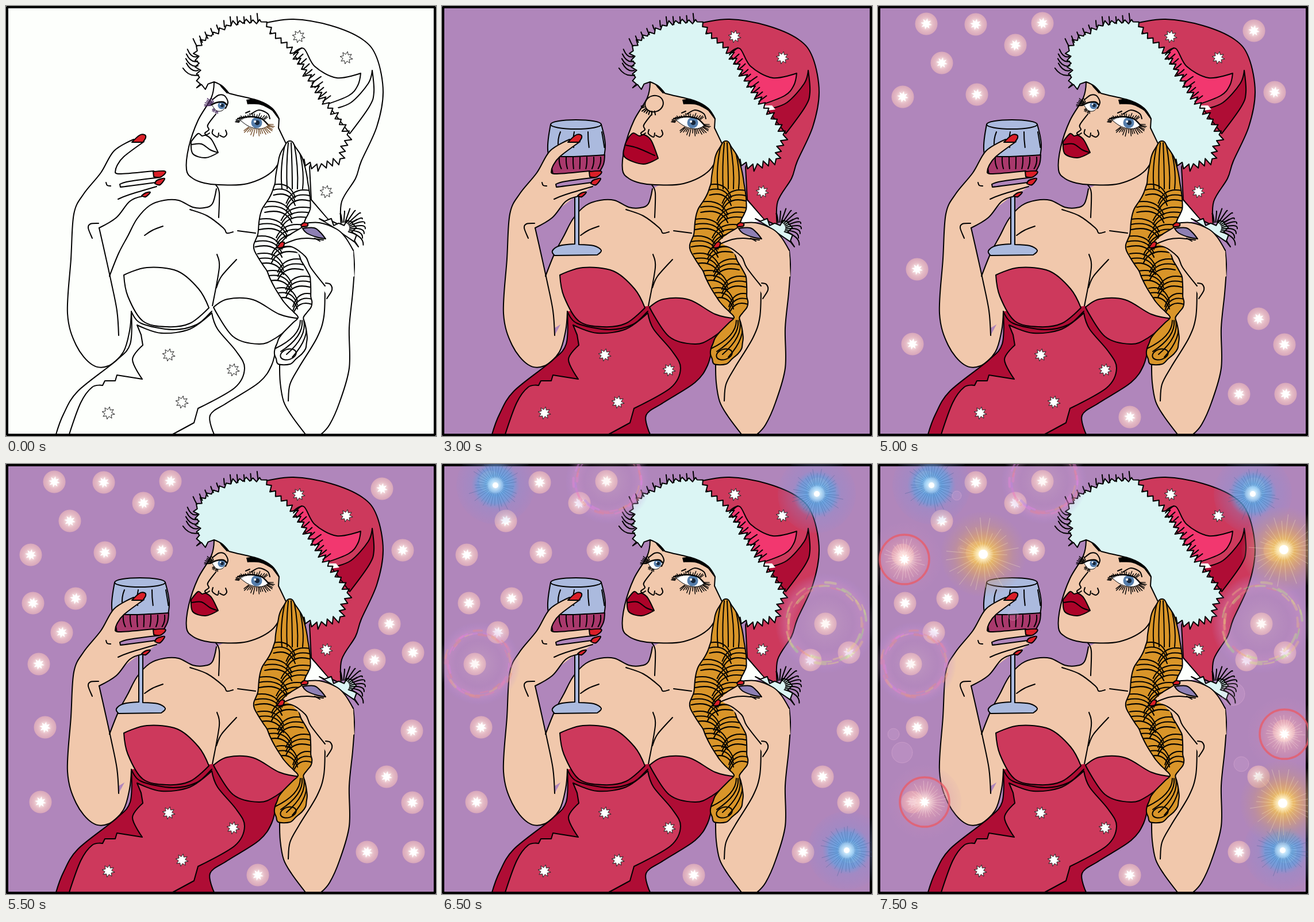
An HTML page with a canvas that plays this animation: 748x748 px, repeating every 8000 ms.

```html
<!DOCTYPE html>
<html lang="en">
<head>
<meta charset="utf-8">
<title>Festive toast</title>
<style>
html, body { margin: 0; width: 100%; height: 100%; overflow: hidden; background: #000; }
canvas { display: block; width: 748px; height: 748px; }
</style>
</head>
<body>
<canvas id="stage" width="748" height="748"></canvas>
<script>
const g = document.getElementById('stage').getContext('2d');
const TAU = Math.PI * 2;
const PAPER = '#fdfffc', BG = '#b086bb', SKIN = '#f1c8ac', RED = '#cd395c', DARK = '#af0d35',
  PINK = '#f2376f', HAIR = '#d99529', FUR = '#dbf5f4', LIP = '#ad0329', NAIL = '#da1f28',
  GLASS = '#abbade', WINE = '#a9396c', RING = '#8e80b4', IRIS = '#557eac';
let lit = true;

const tint = c => lit ? c : PAPER;
const rnd = n => { const v = Math.sin(n * 127.1) * 43758.5; return v - Math.floor(v); };
const mix = (a, b, t) => a + (b - a) * t;

// Points are "x,y"; "!" marks a corner, a final "z" closes the curve.
const parse = s => s.match(/[\d.]+,[\d.]+!?/g).map(w => {
  const [x, y] = w.split(',').map(parseFloat);
  return { x, y, corner: w.endsWith('!') };
});
function trace(s) {
  const p = parse(s), closed = s.endsWith('z'), n = p.length;
  const at = i => closed ? p[(i + n) % n] : p[Math.max(0, Math.min(n - 1, i))];
  const path = new Path2D();
  path.moveTo(p[0].x, p[0].y);
  for (let i = 0; i < (closed ? n : n - 1); i++) {
    const a = at(i - 1), b = at(i), c = at(i + 1), d = at(i + 2);
    const kb = b.corner ? 0 : 1 / 6, kc = c.corner ? 0 : 1 / 6;
    path.bezierCurveTo(b.x + (c.x - a.x) * kb, b.y + (c.y - a.y) * kb,
      c.x - (d.x - b.x) * kc, c.y - (d.y - b.y) * kc, c.x, c.y);
  }
  if (closed) path.closePath();
  return path;
}
function pen(w = 2, color = '#000') { g.lineWidth = w; g.strokeStyle = color; }
function fill(s, color) { g.fillStyle = color; g.fill(trace(s)); }
function line(s, w) { pen(w); s.split(';').forEach(part => g.stroke(trace(part))); }
function area(s, color) { fill(s, color); line(s); }
function disc(x, y, r, color) {
  g.fillStyle = color; g.beginPath(); g.arc(x, y, r, 0, TAU); g.fill();
}
function bend(x0, y0, cx, cy, x1, y1) {
  g.beginPath(); g.moveTo(x0, y0); g.quadraticCurveTo(cx, cy, x1, y1); g.stroke();
}
function star(x, y, R, r, n) {
  g.beginPath();
  for (let i = 0; i < n * 2; i++) {
    const a = .2 + i * Math.PI / n, d = i % 2 ? r : R;
    g.lineTo(x + d * Math.cos(a), y + d * Math.sin(a));
  }
  g.closePath();
}
function spokes(x, y, rx, ry, from, to, n, len) {
  for (let i = 0; i < n; i++) {
    const a = mix(from, to, (i + .4 * rnd(i + x)) / n) * TAU / 360, c = Math.cos(a), s = Math.sin(a);
    const d = len * (.5 + .5 * rnd(i * 3 + y));
    g.beginPath();
    g.moveTo(x + rx * c, y + ry * s);
    g.lineTo(x + (rx + d) * c, y + (ry + d) * s);
    g.stroke();
  }
}

// Even steps along a polyline, each with its outward normal.
function walk(s, step) {
  const p = parse(s), out = [];
  for (let i = 1; i < p.length; i++) {
    const a = p[i - 1], b = p[i], len = Math.hypot(b.x - a.x, b.y - a.y), n = Math.round(len / step);
    for (let j = 0; j < n; j++)
      out.push({ x: mix(a.x, b.x, j / n), y: mix(a.y, b.y, j / n), nx: (b.y - a.y) / len, ny: (a.x - b.x) / len });
  }
  return out;
}
const jagged = (s, step, depth) => walk(s, step).map((p, i) => {
  const d = (i % 2 ? 1 : -1) * depth * (.4 + .9 * rnd(i + 2));
  return `${(p.x + d * p.nx).toFixed(1)},${(p.y + d * p.ny).toFixed(1)}!`;
}).join(' ') + ' ';
function tufts(s, step, len, lift) {
  pen();
  walk(s, step).forEach((p, i) => {
    const d = len * (.6 + .7 * rnd(i + 4)), x = p.x + p.nx * d, y = p.y + p.ny * d;
    bend(p.x, p.y, mix(p.x, x, .6), y + 2, x, y - lift);
  });
}

const shoulder = '180,470! 196,430 212,400 228,370 250,347 275,338 300,338 325,350 345,351 359,344 366,318! ';
const armOut = '222,232! 188,252 165,290 135,327 118,362 113,440 107,535 122,590 150,624 178,626 204,602 215,565 218,532! ';
const armIn = '196,573! 193,530 183,480 172,430 162,386! ';
const armRight = '604,425! 606,455 603,500 597,560 597,630 580,690 563,728 548,745! ';
const elbow = '521,745! 497,713 483,688 477,655 476,622! ';
const jaw = '362,133! 357,160 334,199 318,245 314,285 325,300 345,308 370,311 420,309 465,286 492,238! ';

function body() {
  const skin = tint(SKIN);
  fill(shoulder + '400,300! 490,250! 530,380! 590,402! ' + armRight + elbow + '470,560! 230,540! 196,560!z', skin);
  fill(armOut + armIn + '205,352 240,325! 240,238!z', skin);
  line(shoulder + ';' + armRight + ';' + elbow);
  line('365,311 371,325 370,368;320,354 350,365 378,386 384,395 395,393;403,391 434,395;241,399 255,390 273,383');
  line('367,432 371,455 359,522;401,441 375,470 366,490;555,487 553,540 541,577 510,628 494,658 491,687');
}

function dress() {
  const left = '218,531! 216,588 190,618 125,670 100,710 87,745! ';
  const right = '362,745! 355,712 385,690 440,655 462,625 470,590! ';
  fill(left + right + '512,544! 430,530! 360,522!z', tint(DARK));
  line(left + ';' + right);
  area('228,555! 270,569 320,562 358,534! 368,562 400,600 415,630 398,664 334,700! 327,725! 290,745! 110,745! 130,690 150,663 168,660! 172,652! 190,652! 193,642! 237,649! 220,615 238,590! 235,572!z', tint(RED));
  area('205,468! 245,455 298,461 335,492 353,525! 320,552 280,558 238,548 212,505z', tint(RED));
  area('361,524! 385,510 430,511 475,536 512,544! 470,577 440,588 395,575z', tint(RED));
  line('218,532 235,552 290,563 332,554 358,531');
}

function glass() {
  area('189,206! 184,250 194,293! 257,293! 274,287 284,245 277,206!z', GLASS);
  area('187,261! 225,262 283,259! 281,275 273,290! 193,293!z', WINE);
  g.fillStyle = GLASS;
  g.beginPath(); g.ellipse(233, 206, 44, 8, 0, 0, TAU); g.fill(); g.stroke();
  for (let i = 0; i < 7; i++) {
    const x = 204 + i * 12, out = (x - 236) / 9;
    bend(x, 263, x + out * .3, 274, x - out, 283);
    if (i % 2 === 0) bend(x + 2, 219, x + out, 232, x + 2 + out, 246);
  }
  area('231,325! 231,414! 205,417 192,426 196,434! 270,433! 277,425 264,417 238,415! 238,325!z', GLASS);
}

function leftHand() {
  const index = '240,236! 205,262 193,278 190,289! 200,292 257,287! ';
  const middle = '268,298! 215,305 198,310! 199,315! 215,313 260,307! ';
  const palm = '262,314! 215,328 195,336!';
  const wrist = '237,331! 215,340 192,368 162,386! ';
  fill('222,232! ' + index + '270,298! 262,314! ' + wrist + '130,370! 165,290 188,252z', tint(SKIN));
  fill(middle + 'z', tint(BG));
  line([armOut, armIn, index, middle, palm, wrist, '161,378 147,379 143,386 150,404;174,307 176,312 182,313'].join(';'));
  area('219,237! 232,225 241,224 243,229 238,237!z', NAIL);
  area('256,288! 275,287 277,291 268,298 257,297!z', NAIL);
  area('259,309! 263,303 276,300 268,311z', NAIL);
  area('236,330! 243,325 251,324 243,332z', NAIL);
}

function hat() {
  area('450,30! 500,23 565,34 620,58 645,90 656,150 645,210 618,270 608,300 584,340 583,382! 560,371! 531,337! 528,280! 560,200!z', tint(RED));
  area('500,82! 518,74 537,105 575,125 617,117! 612,138 596,156 552,173!z', tint(PINK));
  area('637,112! 630,135 600,168 566,180! 598,222! 632,175 640,150z', tint(DARK));
  fill('555,173! 574,173! 580,180! 565,182!z', PAPER);
  fill('530,338! 561,373! 520,380!z', PAPER);
}

function fur() {
  const crown = '352,140 335,142 333,100 330,76 345,56 395,29 447,25 462,45 500,79 ';
  const side = '500,79 523,118 548,158 574,188 597,225 582,268 545,281 500,265 492,235 ';
  area('362,132! ' + jagged(crown, 6, 4) + jagged(side, 6, 6) + '474,212! 475,196! 463,178 440,165 400,155 388,152! 376,139z', tint(FUR));
  tufts('335,120 332,80', 8, 22, 14);
  tufts('332,70 380,36 450,25', 11, 9, 4);
  tufts('500,85 523,118 556,174', 9, 14, 2);
}

function eye(shape, lid, x, y, r) {
  g.save();
  g.clip(trace(shape));
  g.fillStyle = '#fff'; g.fillRect(340, 150, 140, 80);
  disc(x, y, r, IRIS); disc(x + 1, y, r * .45, '#17273c'); disc(x - r * .3, y - 2, r * .22, '#fff');
  g.restore();
  line(shape, 1);
  line(lid, 2.5);
}

function face(wink) {
  fill(jaw + '480,190! 420,140!z', tint(SKIN));
  line(jaw);
  line('365,188 351,207 353,215 346,221 349,224 354,221;360,215 359,222 368,228 370,221;372,225 379,228 384,223 382,216');
  fill('368,132! 379,137 389,152! 384,152! 374,141!z', '#000');
  fill('418,163! 440,162 467,172! 479,200! 475,198! 463,182! 443,172 420,171!z', '#000');
  if (wink) {
    pen();
    g.beginPath(); g.ellipse(369, 170, 16, 14, -.3, 0, TAU); g.stroke();
    spokes(366, 173, 15, 10, 75, 185, 8, 8);
  } else {
    line('359,163 370,155 380,156 386,167 382,178');
    eye('358,172! 366,168 378,167 384,173! 376,182 366,182z', '357,172 366,168 378,167 384,172', 375, 173, 6.5);
    pen(1.4, lit ? '#000' : '#4b2c60');
    spokes(365, 173, 9, 6, 175, 250, 8, 13);
    spokes(369, 176, 8, 7, 90, 165, 6, 5);
  }
  line('417,186 424,183;426,188 440,181 455,187 459,196');
  eye('404,196! 418,193 432,193 446,197 457,208! 446,213 434,213 420,208z', '403,196 418,193 432,193 446,197 458,209', 436, 203, 9.5);
  pen(1.4);
  spokes(430, 204, 25, 11, 185, 330, 18, 8);
  pen(1.4, lit ? '#000' : '#77502e');
  spokes(437, 206, 19, 8, 0, 150, 18, 13);
  if (wink) {
    area('325,228! 333,221 343,226 352,224 364,234 376,265! 350,275 318,263 318,243z', LIP);
    line('319,242 340,247 370,260');
  } else {
    area('322,236! 334,222 341,226 348,225 358,233 369,255! 347,264 325,257z', tint(LIP));
    line('323,241 340,240 355,250 368,255');
  }
}

// Braid spine: y, centre x, half width.
const SPINE = [[236, 494, 4], [260, 494, 20], [310, 498, 30], [355, 487, 42], [420, 468, 38], [470, 492, 36],
  [520, 510, 24], [541, 513, 4], [575, 501, 25], [600, 492, 28], [623, 484, 10]];
function spine(y) {
  const i = Math.max(1, SPINE.findIndex(k => k[0] >= y)), a = SPINE[i - 1], b = SPINE[i];
  const t = (y - a[0]) / (b[0] - a[0]);
  return { x: mix(a[1], b[1], t), w: mix(a[2], b[2], t) };
}
function braid() {
  const left = [], right = [];
  for (let y = 236; y <= 623; y += 9) {
    const { x, w } = spine(y), bump = k => w * (.92 + .1 * Math.abs(Math.sin(y / 33 * Math.PI / 2 + k)));
    left.push(`${x - bump(0)},${y}`);
    right.unshift(`${x + bump(1)},${y}`);
  }
  const shape = left.join(' ') + ' ' + right.join(' ') + 'z';
  fill(shape, tint(HAIR));
  g.save();
  g.clip(trace(shape));
  pen();
  for (let k = 0; k < 5; k++) bend(486 + k * 5, 238, 476 + k * 11, 280, 480 + k * 9, 318);
  for (let row = 0; row < 7; row++)
    for (const side of [-1, 1])
      for (let k = 0; k < 3; k++) {
        const y = 315 + row * 30 + (side > 0 ? 10 : 0), { x, w } = spine(y);
        bend(x + side * w, y + k * 9 - 4, x + side * w * .1, y + k * 8 - 10, x - side * w * .2, y + 18 + k * 7);
      }
  for (let k = 0; k < 4; k++) bend(512 + k * 3, 547, 512 + k * 6, 575, 468 + k * 10, 596 + k * 5);
  g.beginPath(); g.ellipse(491, 606, 14, 9, -.3, 0, TAU); g.stroke();
  g.restore();
  line(shape);
}

function pompom() {
  area('545,370! ' + jagged('556,370 580,381 608,371 604,392 613,414 600,414', 8, 4) + '591,400! 565,382!z', tint(FUR));
  pen();
  for (let i = 0; i < 11; i++) {
    const a = -1.9 + i * .26, r = 30 + 10 * rnd(i), c = Math.cos(a), s = Math.sin(a);
    bend(588 + 10 * c, 386 + 10 * s, 588 + r * c + 4, 380 + r * s * .8, 591 + r * c, 390 + r * s);
  }
}

function rightHand() {
  const back = '515,379! 545,377 575,388 590,402 604,425! ';
  const under = '474,421! 497,419 521,436 530,455 555,487! ';
  fill('482,410! 498,396 515,386! ' + back + '606,470! 556,500! 530,455 497,419!z', tint(SKIN));
  line(back + ';' + under);
  line('480,410 490,400 515,385;481,415 505,406 525,404 552,407;537,404 546,409;556,482 564,484 567,494 558,509');
  area('516,387! 536,386 547,394 556,405! 540,402 523,395z', RING);
  area('513,381! 518,377 525,378! 524,383 514,384!z', NAIL);
  area('471,421! 478,411 484,411! 482,419z', NAIL);
}

function spangle([x, y]) {
  star(x, y, 11, 6, 8);
  g.fillStyle = tint('#fff'); g.fill();
  pen(1, '#222'); g.stroke();
}

// Soft disc from "alpha-at-radius" stops.
function glow(x, y, r, ...stops) {
  const q = g.createRadialGradient(x, y, 0, x, y, r);
  stops.forEach(([k, rgb, a]) => q.addColorStop(k, `rgba(${rgb},${a})`));
  disc(x, y, r, q);
}
const WHITE = '255,255,255';
function bulb(x, y) {
  glow(x, y, 20, [0, WHITE, 1], [.35, '248,222,220', .9], [.6, '234,192,198', .9], [.95, '224,174,187', .85], [1, '224,174,187', 0]);
  star(x, y, 10, 5, 8);
  g.fillStyle = '#fff'; g.fill();
}
function halo(x, y, r, hue) {
  glow(x, y, r * 1.25, [0, '255,225,210', .2], [.55, '205,150,205', .1], [.78, '215,150,205', .35], [1, '170,140,225', 0]);
  for (let i = 0; i < 40; i++) {
    const a = i / 40 * TAU;
    pen(2 + 3 * rnd(i), `hsla(${hue + 120 * rnd(i + 9) - 60},75%,72%,.35)`);
    g.beginPath(); g.arc(x, y, r * mix(.86, 1.02, rnd(i + x)), a, a + .25); g.stroke();
  }
}
function blue(x, y) {
  glow(x, y, 68, [0, WHITE, 1], [.1, '185,225,250', .9], [.25, '95,170,232', .85], [.46, '100,160,225', .7], [.62, '130,145,215', .3], [1, '130,140,220', .06]);
  pen(.8, 'rgba(50,85,140,.45)'); spokes(x, y, 14, 14, 0, 360, 36, 34);
  disc(x, y, 5, '#fff');
}
function red(x, y) {
  glow(x, y, 64, [0, WHITE, 1], [.12, '255,225,220', .85], [.35, '232,165,180', .6], [.64, '215,140,170', .45], [.7, '200,140,185', .22], [1, '190,140,190', .05]);
  pen(3.5, 'rgba(235,90,100,.75)');
  g.beginPath(); g.arc(x, y, 43, 0, TAU); g.stroke();
  pen(.8, 'rgba(255,230,225,.5)'); spokes(x, y, 8, 8, 0, 360, 30, 30);
  star(x, y, 10, 5, 9); g.fillStyle = '#fff'; g.fill();
}
function gold(x, y) {
  glow(x, y, 74, [0, WHITE, 1], [.12, '255,240,190', .95], [.25, '236,188,95', .9], [.45, '222,165,105', .7], [.7, '200,150,130', .4], [1, '190,145,150', .04]);
  pen(1, 'rgba(255,238,200,.38)'); spokes(x, y, 8, 8, 0, 360, 26, 60);
  disc(x, y, 8, '#fff');
}
function ghost(x, y, r) {
  disc(x, y, r, 'rgba(235,190,225,.15)');
  pen(1, 'rgba(240,190,220,.3)');
  g.beginPath(); g.arc(x, y, r, 0, TAU); g.stroke();
}

const SPANGLES = [[509, 53], [592, 90], [557, 323], [283, 607], [395, 633], [306, 689], [178, 708]];
// Each cue: the half-second it starts at, the light, its places.
const CUES = [
  [8, bulb, [84, 31], [170, 32], [43, 158], [68, 458], [707, 589], [628, 675], [709, 675]],
  [9, bulb, [111, 99], [172, 154], [654, 43], [690, 150], [60, 588], [662, 544]],
  [10, bulb, [286, 30], [239, 68], [271, 150], [438, 715]],
  [11, bulb, [47, 242], [121, 234], [97, 293], [57, 348], [667, 278], [641, 341], [708, 328], [706, 464]],
  [12, halo, [289, 30, 60, 320], [667, 277, 70, 50], [64, 347, 58, 340]],
  [13, blue, [93, 37], [652, 52], [704, 672]],
  [14, red, [46, 166], [81, 588], [707, 470]],
  [14, ghost, [27, 470, 10], [42, 502, 18], [632, 522, 13], [145, 148, 6]],
  [15, gold, [183, 157], [706, 149], [704, 590]],
  [15, ghost, [235, 263, 9], [618, 400, 20], [137, 55, 8]]
];

function draw(step) {
  lit = step >= 2;
  g.fillStyle = tint(BG);
  g.fillRect(0, 0, 748, 748);
  body();
  dress();
  if (lit) glass();
  leftHand();
  face(step === 6);
  hat();
  fur();
  braid();
  pompom();
  rightHand();
  SPANGLES.forEach(spangle);
  pen(4); g.strokeRect(2, 2, 744, 744);
  for (const [from, light, ...spots] of CUES)
    if (step >= from) spots.forEach(s => light(...s));
}

g.lineJoin = g.lineCap = 'round';
const start = performance.now();
let shown = -1;
function tick() {
  const step = Math.floor((performance.now() - start) % 8000 / 500);
  if (step !== shown) draw(shown = step);
  requestAnimationFrame(tick);
}
tick();
</script>
</body>
</html>
```
